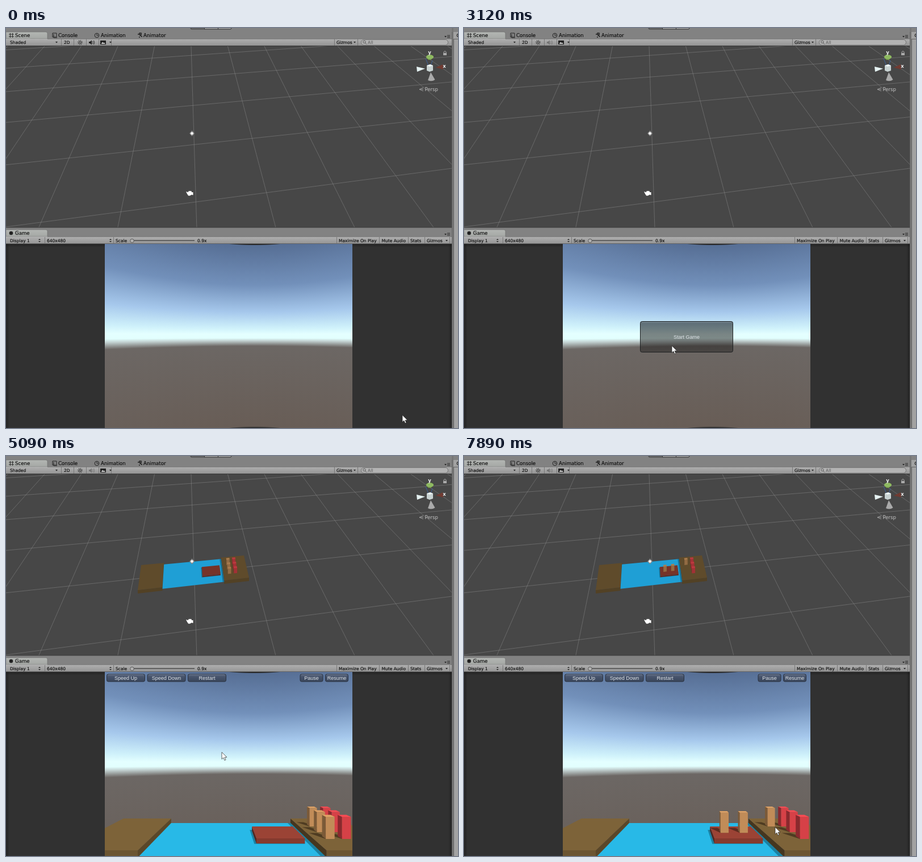
Animation of 796 by 704 pixels, one loop 8000 ms. Source, as an HTML page:

```html
<!DOCTYPE html>
<html lang="en">
<head>
<meta charset="utf-8">
<title>Editor play mode</title>
<style>
html, body { margin: 0; width: 100%; height: 100%; overflow: hidden; background: #828282; }
svg { display: block; }
text { font-family: "DejaVu Sans", sans-serif; font-size: 7.5px; fill: #0c0c0c; stroke: #0c0c0c; stroke-width: .15px; }
.tab { font-size: 8.6px; }
.ui { font: 9px "Liberation Sans", Arial, sans-serif; fill: #dfe4e8; stroke: none; text-anchor: middle; }
.axis { font-size: 8.5px; font-weight: bold; fill: #eee; stroke: none; text-anchor: middle; }
</style>
</head>
<body>
<svg id="stage" width="796" height="704" viewBox="0 0 796 704">
  <defs>
    <linearGradient id="bar" x2="0" y2="1"><stop stop-color="#b0b0b0"/><stop offset="1" stop-color="#949494"/></linearGradient>
    <linearGradient id="tab" x2="0" y2="1"><stop stop-color="#b3b6b3"/><stop offset="1" stop-color="#a5a8a5"/></linearGradient>
    <linearGradient id="sky" gradientUnits="userSpaceOnUse" x1="0" y1="-162" x2="0" y2="162">
      <stop stop-color="#566e94"/><stop offset=".22" stop-color="#7290ba"/><stop offset=".37" stop-color="#a6c8ec"/>
      <stop offset=".46" stop-color="#d0f2fb"/><stop offset=".49" stop-color="#e4ffff"/><stop offset=".512" stop-color="#e2fffe"/>
      <stop offset=".526" stop-color="#c3d2d2"/><stop offset=".555" stop-color="#6c6764"/><stop offset="1" stop-color="#685d56"/>
    </linearGradient>
    <linearGradient id="glass" x2="0" y2="1">
      <stop stop-color="#0a0c0e" stop-opacity=".55"/><stop offset=".5" stop-color="#14100e" stop-opacity=".5"/><stop offset="1" stop-color="#141414" stop-opacity=".4"/>
    </linearGradient>
    <linearGradient id="pill" x2="0" y2="1"><stop stop-color="#5a667c"/><stop offset=".4" stop-color="#46536b"/><stop offset="1" stop-color="#3a465b"/></linearGradient>
    <linearGradient id="edge"><stop stop-color="#000" stop-opacity=".3"/><stop offset="1" stop-color="#000" stop-opacity="0"/></linearGradient>
    <linearGradient id="edgeTop" x2="0" y2="1"><stop stop-color="#000" stop-opacity=".3"/><stop offset="1" stop-color="#000" stop-opacity="0"/></linearGradient>
    <clipPath id="sceneClip"><path d="M0 32H785V351H0Z"/></clipPath>
    <clipPath id="gameClip"><path d="M174 380H610V704H174Z"/></clipPath>
  </defs>

  <rect width="796" height="704" fill="#828282"/>
  <rect x="325" y="-6" width="72" height="8" rx="2" fill="#a8a8a8" stroke="#2c2c2c"/>
  <path d="M326 0H349V1H326Z" fill="#555"/>
  <path d="M349.500 0V2M373.500 0V2" stroke="#333"/>
  <path d="M785 0H788V704H785Z" fill="#777"/>
  <path d="M788 7H796V704H788Z" fill="#a2a2a2"/>
  <path d="M785.500 7V704M788.500 19V704M788 19.500H796" stroke="#666" fill="none"/>
  <circle cx="797" cy="13" r="2.800" fill="none" stroke="#222" stroke-width="1.200"/>

  <!-- scene panel -->
  <path d="M0 19V7H70Q73 7 73 10V19Z" fill="url(#tab)" stroke="#6a6a6a" stroke-width=".6"/>
  <rect y="19" width="785" height="12" fill="url(#bar)"/>
  <path d="M73 19.300H785" stroke="#666" stroke-width=".7"/>
  <g clip-path="url(#sceneClip)">
    <rect y="32" width="785" height="319" fill="#474747"/>
    <g id="grid" stroke="#9a9a9a" stroke-opacity=".45" stroke-width=".9"></g>
    <g id="miniWorld"></g>
    <path d="M327.500 180.500L332 185.500 327.500 190.500 323 185.500Z" fill="#8b8b8b"/>
    <circle cx="327.500" cy="185.500" r="2.300" fill="#fff"/>
    <path d="M317 288L321 289Q321 286 324 287Q327 286 327 289L329.500 289V294L326 293.500Q325 296 321 295L319 292Z" fill="#fff"/>
  </g>
  <path d="M0 31.500H785M0 351H785" stroke="#3a3a3a"/>

  <!-- orientation gizmo -->
  <path d="M739 54L744 66M751 57L748 66" stroke="#3e629b"/>
  <path d="M740 52Q740 47 746 47Q753 47 753 52L748 56H744Z" fill="#78a14c"/>
  <ellipse cx="746.500" cy="51" rx="6.500" ry="3.400" fill="#8fba62"/>
  <path d="M723 68L738 71.500 724 77Z" fill="#e5f2f2"/>
  <path d="M757 69.500L769 64 770 73Z" fill="#713a31"/>
  <path d="M748 78L755.500 91Q750 95 743 92Z" fill="#aaa"/>
  <path d="M741 66L747 64 752 66V75L746 77 741 75Z" fill="#c7d1d1"/>
  <path d="M741 66L747 64 752 66 746 68Z" fill="#eef5f5"/>
  <text class="axis" x="746" y="46">y</text><text class="axis" x="772" y="70">x</text>
  <text x="737.500" y="111" style="font-size:8.500px;fill:#c4c4c4;stroke:none">Persp</text>
  <path d="M735 105L728 108 735 111M728 108H735" fill="none" stroke="#aaa" stroke-width=".8"/>
  <path d="M771 44V42Q773 39 775 42V44" fill="none" stroke="#aaa"/><path d="M770 44H776V48H770Z" fill="#aaa"/>

  <!-- game panel -->
  <path d="M0 367V355H70Q73 355 73 358V367Z" fill="url(#tab)" stroke="#6a6a6a" stroke-width=".6"/>
  <rect y="367" width="785" height="13" fill="url(#bar)"/>
  <path d="M73 367.300H785" stroke="#666" stroke-width=".7"/>
  <rect y="380" width="785" height="324" fill="#313131"/>
  <rect y="380" width="6" height="324" fill="url(#edge)"/>
  <rect y="380" width="785" height="6" fill="url(#edgeTop)"/>
  <rect x="-785" y="380" width="6" height="324" fill="url(#edge)" transform="scale(-1 1)"/>
  <path d="M0 380H785" stroke="#333"/>
  <g clip-path="url(#gameClip)">
    <g id="strips"></g>
    <g id="world"></g>
    <g id="hud"></g>
    <g id="start">
      <rect x="310.500" y="516.500" width="163" height="54" rx="3" fill="url(#glass)" stroke="#1c1f20"/>
      <path d="M313 518H471" stroke="#bcd0d8" stroke-opacity=".4"/>
      <text class="ui" x="392" y="547">Start Game</text>
    </g>
  </g>

  <g id="chrome"></g>
  <!-- tab icons -->
  <path d="M7.500 9V17M11.500 9V17M5 11H14M5 15H14" stroke="#222" stroke-width=".9"/>
  <path d="M82 9H89V16H82ZM84 11V17H90" fill="none" stroke="#222"/>
  <circle cx="160" cy="13" r="3.800" fill="none" stroke="#222"/><path d="M160 10.500V13H162.500" fill="none" stroke="#222"/>
  <path d="M232 11H235V9H238V12H235M235 12L239 15M234 16H236M238 15H240" fill="none" stroke="#222" stroke-width="1.500"/>
  <circle cx="9" cy="361" r="3.300" fill="#222"/>
  <!-- toolbar icons -->
  <circle cx="130.500" cy="25.500" r="3.400" fill="none" stroke="#222" stroke-width="1.800" stroke-dasharray=".9 1.770"/>
  <circle cx="130.500" cy="25.500" r="1.700" fill="none" stroke="#222"/>
  <g id="speaker">
    <path d="M146 24H148L151 21.500V29.500L148 27H146Z" fill="#222"/>
    <path d="M152.500 23Q154 25.500 152.500 28M154.500 22Q157 25.500 154.500 29" fill="none" stroke="#222" stroke-width=".9"/>
  </g>
  <path d="M166 22H176V29H166Z" fill="#222"/><path d="M167.500 28L170 24.500 172 26.500 173 25.500 175 28Z" fill="#ccc"/>
  <rect x="625.500" y="20.500" width="153" height="9.500" rx="4.700" fill="#b3b3b3" stroke="#666" stroke-width=".8"/>
  <circle cx="631" cy="24.500" r="2.200" fill="none" stroke="#444" stroke-width=".8"/><path d="M632.500 26L635 28.500" stroke="#444"/>
  <text x="637" y="27.500" style="fill:#555;stroke:none">All</text>
  <path d="M222 374H332" stroke="#4b4b4b" stroke-width="1.300"/>
  <circle cx="222" cy="374.500" r="3.300" fill="#b2b2b2" stroke="#444" stroke-width=".8"/>

  <path id="arrow" d="M0 .3V12.500L2.900 9.900 4.900 14.600 7 13.700 5 9.200H9Z" fill="#fff" stroke="#222" stroke-width=".7"/>
  <path id="resize" d="M630 346.500L633.500 350.500H631V358.500H633.500L630 362.500 626.500 358.500H629V350.500H626.500Z" fill="#fff" stroke="#222" stroke-width=".8"/>
</svg>
<script>
const $ = id => document.getElementById(id);
const show = (id, on) => $(id).setAttribute('visibility', on ? 'visible' : 'hidden');
const mix = (a, b, k) => a + (b - a) * k;

// Perspective floor grid: lines meet far above the view.
function drawGrid() {
  let out = '';
  const line = (x1, y1, x2, y2) => out += `<line x1="${x1}" y1="${y1}" x2="${x2}" y2="${y2}"/>`;
  const xAt = (k, y) => 326 + .031 * (y - 32) + k * 64.5 * (y + 244) / 276;
  for (let k = -5; k <= 7; k++) line(xAt(k, 32), 32, xAt(k, 351), 351);
  for (let k = 0; k < 6; k++) line(0, 580 / (1 + .232 * k) - 230, 785, 477 / (1 + .234 * k) - 230);
  $('grid').innerHTML = out;
}

// Sky bands depend on elevation, so each column stretches away from the darkest one.
function drawSky() {
  const reach = x => Math.hypot(283, x - 45);
  let out = '';
  for (let x = -218; x < 218; x += 2)
    out += `<rect width="2" y="-162" height="324" fill="url(#sky)" transform="translate(${392 + x} 542) scale(1 ${reach(x) / reach(0)})"/>`;
  $('strips').innerHTML = out;
}

// World: x across, h height above the banks, z distance. Each view projects it to the stage.
const NEAR = 1, FAR = 1.583, WATER = -12.7, LEFT = -293, RIGHT = 306, SHORE = [-160, 172.6];
const gameView = {
  light: 1, water: '#28b9e7',
  at: (x, h, z) => [392 + x / z, 542 + (152 - h) / z]
};
const sceneView = {
  light: .76, water: '#1f9fd5',
  at(x, h, z) {
    const u = (x - LEFT) / (RIGHT - LEFT), v = (FAR - z) / (FAR - NEAR);
    return [mix(mix(238, 419, u), mix(232, 428, u), v), mix(mix(192, 175, u), mix(236, 214, u), v) - h * .2];
  }
};

const shade = (hex, k) =>
  `rgb(${[1, 3, 5].map(i => Math.min(255, Math.round(parseInt(hex.slice(i, i + 2), 16) * k)))})`;
const poly = (view, points, fill, opacity = 1) =>
  `<polygon points="${points.map(p => view.at(...p).map(n => n.toFixed(1)))}" fill="${fill}" opacity="${opacity}"/>`;
const floor = (x0, x1, h, z0, z1, slide = 0) => [[x0, h, z0], [x1, h, z0], [x1 - slide, h, z1], [x0 - slide, h, z1]];

function box(view, color, x0, x1, low, high, z0, z1) {
  const face = (points, k) => poly(view, points, shade(color, k * view.light));
  const side = x => [[x, high, z0], [x, high, z1], [x, low, z1], [x, low, z0]];
  return (x0 > 0 ? face(side(x0), .55) : face(side(x1), .72)) +
    face([[x0, high, z0], [x1, high, z0], [x1, low, z0], [x0, low, z0]], .86) +
    face(floor(x0, x1, high, z0, z1), 1);
}

function person(view, color, x, ground, z) {
  return poly(view, floor(x, x + 18, ground, z, z + .1, 20), '#20150a', view === gameView ? .5 : 0) +
    box(view, color, x, x + 18, ground, ground + 45, z, z + .045);
}

function world(view, aboard) {
  const earth = '#7d6339', tan = '#e0a366', red = '#f94b53', deck = -2;
  let out = box(view, earth, LEFT, SHORE[0], -30, 0, NEAR, FAR) +
    box(view, earth, SHORE[1], RIGHT, -30, 0, NEAR, FAR) +
    poly(view, floor(...SHORE, WATER, NEAR, FAR), view.water) +
    poly(view, floor(SHORE[1] - 8, SHORE[1], WATER, NEAR, FAR), '#0d4a60', .5) +
    poly(view, floor(53, 158, WATER, 1.17, 1.42), '#0d4a60', .5) +
    box(view, '#9b4335', 57.6, 158, WATER, deck, 1.176, 1.4);
  for (let seat = 0; seat < aboard; seat++) out += person(view, tan, 76 + 43 * seat, deck, 1.27);
  for (let row = 2; row >= 0; row--) {
    const z = 1.1515 + .115 * row;
    out += person(view, red, 230, 0, z);
    if (row >= aboard) out += person(view, tan, 197, 0, z);
  }
  return out;
}

function drawChrome() {
  const text = (s, x, y, cls = '') => `<text class="${cls}" x="${x}" y="${y}">${s}</text>`;
  const split = (x, y) => `<path d="M${x}.5 ${y}v12" stroke="#6c6c6c" stroke-width=".8"/>`;
  const down = (x, y) => `<path d="M${x} ${y}h4l-2 2.500z" fill="#222"/>`;
  const menu = y => down(772, y) + `<path d="M777 ${y - 1}h5m-5 2h5m-5 2h5" stroke="#222" stroke-width=".8"/>`;
  const updown = x => `<path d="M${x} 373h4l-2-2zM${x} 375h4l-2 2z" fill="#222"/>`;
  const tabs = { Scene: 16, Console: 92, Animation: 167, Animator: 242 };
  const sceneBar = { Shaded: 7, '2D': 102, Gizmos: 582 };
  const gameBar = { 'Display 1': 7, '640x480': 72, Scale: 193, '0.9x': 337, 'Maximize On Play': 586, 'Mute Audio': 661.5, Stats: 712, Gizmos: 741 };
  const row = (items, y, cls) => Object.entries(items).map(([s, x]) => text(s, x, y, cls)).join('');
  let out = row(tabs, 16, 'tab') + text('Game', 16, 364, 'tab') + row(sceneBar, 28) + row(gameBar, 376.5);
  for (const s in gameBar) if (!['Display 1', '0.9x'].includes(s)) out += split(Math.floor(gameBar[s]) - 4, 368);
  for (let x = 97; x < 190; x += 22) out += split(x, 19);
  $('chrome').innerHTML = out + split(578, 19) + split(619, 19) + split(781, 368) + menu(14) + menu(362) +
    down(87, 24) + down(182, 24) + down(612, 24) + down(774, 373) + updown(57) + updown(182);

  const button = (s, x, w) =>
    `<rect x="${x + .5}" y="384" width="${w - 1}" height="13" rx="2.500" fill="url(#pill)" stroke="#29313f"/>` +
    `<path d="M${x + 3} 385H${x + w - 3}" stroke="#8795ac" stroke-opacity=".6"/>` + text(s, x + w / 2, 394, 'ui');
  $('hud').innerHTML = ['Speed Up', 'Speed Down', 'Restart'].map((s, i) => button(s, 177 + 71.5 * i, 68)).join('') +
    ['Pause', 'Resume'].map((s, i) => button(s, 517.5 + 44.5 * i, 41)).join('');
}

// Turning points of the pointer's path: [time, x, y].
const path = [[0, 698, 682], [140, 684, 538], [640, 648, 385], [2350, 379, 371], [2610, 353, 554], [2790, 342, 573],
  [3290, 378, 552], [4900, 378, 552], [5090, 380, 521], [5480, 508, 618], [5990, 562, 677], [6370, 570, 671], [7890, 548, 653]];

function pointerAt(t) {
  const next = path.findIndex(p => p[0] > t);
  if (next < 0) return path.at(-1).slice(1);
  const [t0, x0, y0] = path[next - 1], [t1, x1, y1] = path[next];
  const k = (t - t0) / (t1 - t0);
  return [mix(x0, x1, k), mix(y0, y1, k)].map(Math.round);
}

let drawn = -1;
function render(t) {
  const aboard = (t >= 7000) + (t >= 7890);
  if (aboard !== drawn) {
    $('world').innerHTML = world(gameView, aboard);
    $('miniWorld').innerHTML = world(sceneView, aboard);
    drawn = aboard;
  }
  show('miniWorld', t >= 3840);
  show('world', t >= 4020);
  show('hud', t >= 4020);
  show('start', t >= 140 && t < 4020);
  show('resize', t >= 2180 && t < 2350);
  show('arrow', t < 640 || t >= 2350);
  $('speaker').setAttribute('opacity', t < 140 ? 1 : .35);
  $('arrow').setAttribute('transform', `translate(${pointerAt(t)})`);
}

drawGrid();
drawSky();
drawChrome();
const begin = performance.now();
function tick() {
  render((performance.now() - begin) % 8000);
  requestAnimationFrame(tick);
}
tick();
</script>
</body>
</html>
```
